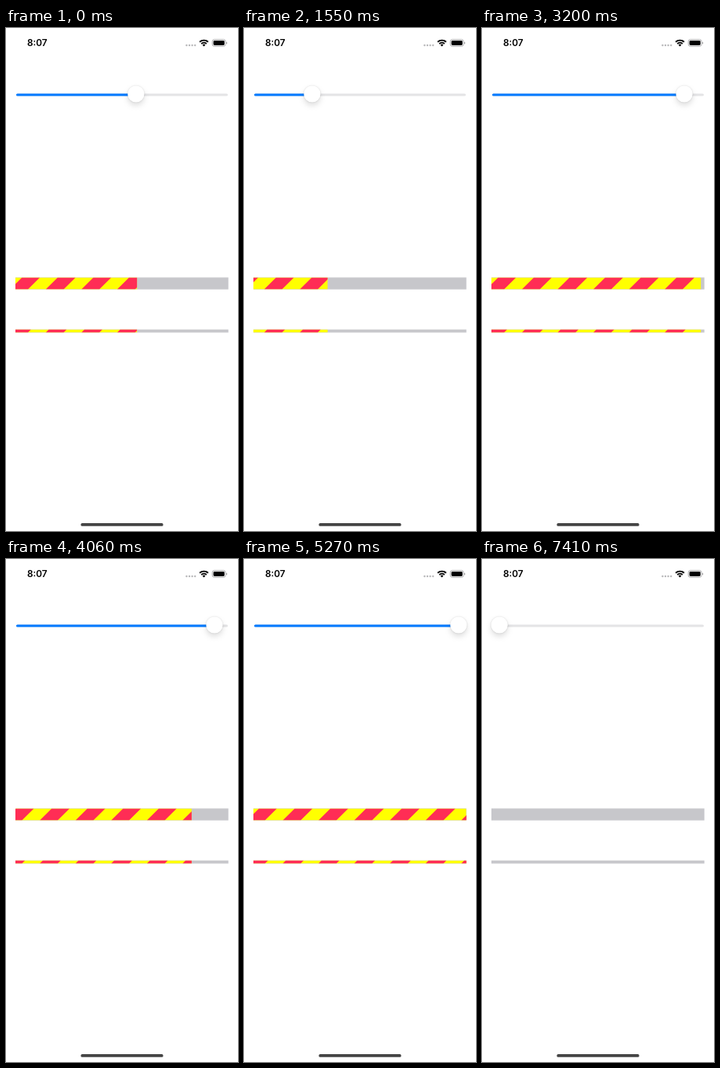
These frames come from a looping animation (296 px wide and 640 px high, 8 s). An HTML page:

```html
<!DOCTYPE html>
<html lang="en">
<head>
<meta charset="utf-8">
<title>Slider and striped progress bars</title>
<style>
  html, body { margin: 0; width: 100%; height: 100%; overflow: hidden; background: #fff; }
  #stage { display: block; width: 296px; height: 640px; }
  .time { font: 600 11.8px Inter, Roboto, sans-serif; }
  .rest { fill: #c7c7cb; }
  .red { fill: #ff2d55; }
  .yellow { fill: #ff0; }
  #thumb circle { fill: #fff; }
  #thumb { filter: drop-shadow(0 .4px 1.3px rgba(0,0,0,.14)) drop-shadow(0 4px 3.6px rgba(0,0,0,.13)); }
</style>
</head>
<body>
<svg id="stage" viewBox="0 0 296 640">
  <text class="time" x="27" y="23">8:07</text>

  <g fill="#b9b9bb">
    <circle cx="230.4" cy="22" r="1.2"/>
    <circle cx="234" cy="22" r="1.2"/>
    <circle cx="237.6" cy="22" r="1.2"/>
    <circle cx="241.2" cy="22" r="1.2"/>
  </g>

  <g fill="none" stroke="#000" stroke-width="1.9">
    <path d="M247.1 17.8a7.7 7.7 0 0 1 10.8 0"/>
    <path d="M249.2 20.1a4.7 4.7 0 0 1 6.6 0"/>
  </g>
  <path d="M250.6 21.4a2.8 2.8 0 0 1 3.8 0l-1.9 2z"/>

  <rect x="263.2" y="14.6" width="16.9" height="8.7" rx="2.6" fill="none" stroke="#a5a5a7" stroke-width=".9"/>
  <rect x="264.6" y="16" width="14.1" height="5.9" rx="1.4"/>
  <path d="M281 17.4q1.3.5 1.3 1.6t-1.3 1.6z" fill="#a5a5a7"/>

  <rect x="13" y="83.5" width="270" height="3" rx="1.5" fill="#e4e4e6"/>
  <rect id="track" x="13" y="83.5" height="3" rx="1.5" fill="#007aff"/>
  <g id="thumb"><circle cy="84" r="10.6"/></g>

  <rect class="rest" x="12" y="317.4" width="271.7" height="15.2"/>
  <svg class="bar" x="12" y="317.4" height="15.2"></svg>
  <rect class="rest" x="12" y="383.6" width="271.7" height="3.9"/>
  <svg class="bar" x="12" y="383.6" height="3.9"></svg>

  <rect x="95.4" y="630" width="105.2" height="3.8" rx="1.9" fill="#444"/>
</svg>

<script>
const LOOP = 8000, LAG = 270, PERIOD = 45.54, TURNS = 0.1036, LAST = 68;
const MIN_X = 22.2, TRAVEL = 251.6, BAR_W = 271.7;

// Every mark starts a run of eight ticks
const marks = [0, 870, 1780, 2660, 3520, 4390, 5270, 6130, 6980, 7830];

// Dragged slider value: [ms, value]
const drag = [
  [0, .571], [350, .571], [600, .537], [870, .452], [1280, .349],
  [1550, .258], [1760, .22], [2200, .5], [2660, .913], [2800, 1],
  [2930, .983], [3200, .937], [3520, .81], [3790, .827], [4060, .968],
  [4280, 1], [5290, 1], [5860, .618], [6130, .425], [6710, .18],
  [6980, .07], [7110, 0]
];

const rise = i => (drag[i + 1][1] - drag[i][1]) / (drag[i + 1][0] - drag[i][0]);

// Slopes that never overshoot the points
const slopes = drag.map((_, i) => {
  if (i === 0 || i === drag.length - 1) return 0;
  const a = rise(i - 1), b = rise(i);
  return a * b > 0 ? 2 * a * b / (a + b) : 0;
});

function valueAt(t) {
  if (t <= 0) return drag[0][1];
  const i = drag.findIndex(p => p[0] > t) - 1;
  if (i < 0) return drag[drag.length - 1][1];
  const [t0, v0] = drag[i], [t1, v1] = drag[i + 1];
  const h = t1 - t0, s = (t - t0) / h, r = 1 - s;
  return v0 * r * r * (1 + 2 * s) + v1 * s * s * (3 - 2 * s)
       + h * s * r * (slopes[i] * r - slopes[i + 1] * s);
}

function tickAt(t) {
  let i = 0;
  while (i < marks.length - 2 && t >= marks[i + 1]) i++;
  const span = marks[i + 1] - marks[i];
  const step = Math.min(7, Math.floor((t - marks[i]) / span * 8 + .1));
  const n = Math.min(LAST, i * 8 + step);
  return { n, time: marks[i] + (n - i * 8) * span / 8 };
}

const track = document.getElementById('track');
const thumb = document.getElementById('thumb');
const bars = [...document.querySelectorAll('.bar')];

const stripes = bars.map(bar => {
  const h = +bar.getAttribute('height');
  let d = '';
  for (let i = -2; i < 8; i++) {
    const x = i * PERIOD - 6.8;
    d += `M${x} ${h}h${PERIOD / 2}l${h} ${-h}h${-PERIOD / 2}z`;
  }
  bar.innerHTML = `<rect class="yellow" width="${BAR_W}" height="${h}"/><path class="red" d="${d}"/>`;
  return bar.lastChild;
});

function draw(now) {
  const { n, time } = tickAt(now % LOOP);
  const x = MIN_X + TRAVEL * valueAt(time);
  const width = BAR_W * valueAt(time - LAG);
  const shift = (n * TURNS % 1) * PERIOD;

  thumb.setAttribute('transform', `translate(${x} 0)`);
  track.setAttribute('width', x - 13);
  bars.forEach(bar => bar.setAttribute('width', width));
  stripes.forEach(s => s.setAttribute('transform', `translate(${shift} 0)`));
}

const start = performance.now();
function loop() {
  draw(performance.now() - start);
  requestAnimationFrame(loop);
}
loop();
</script>
</body>
</html>
```
